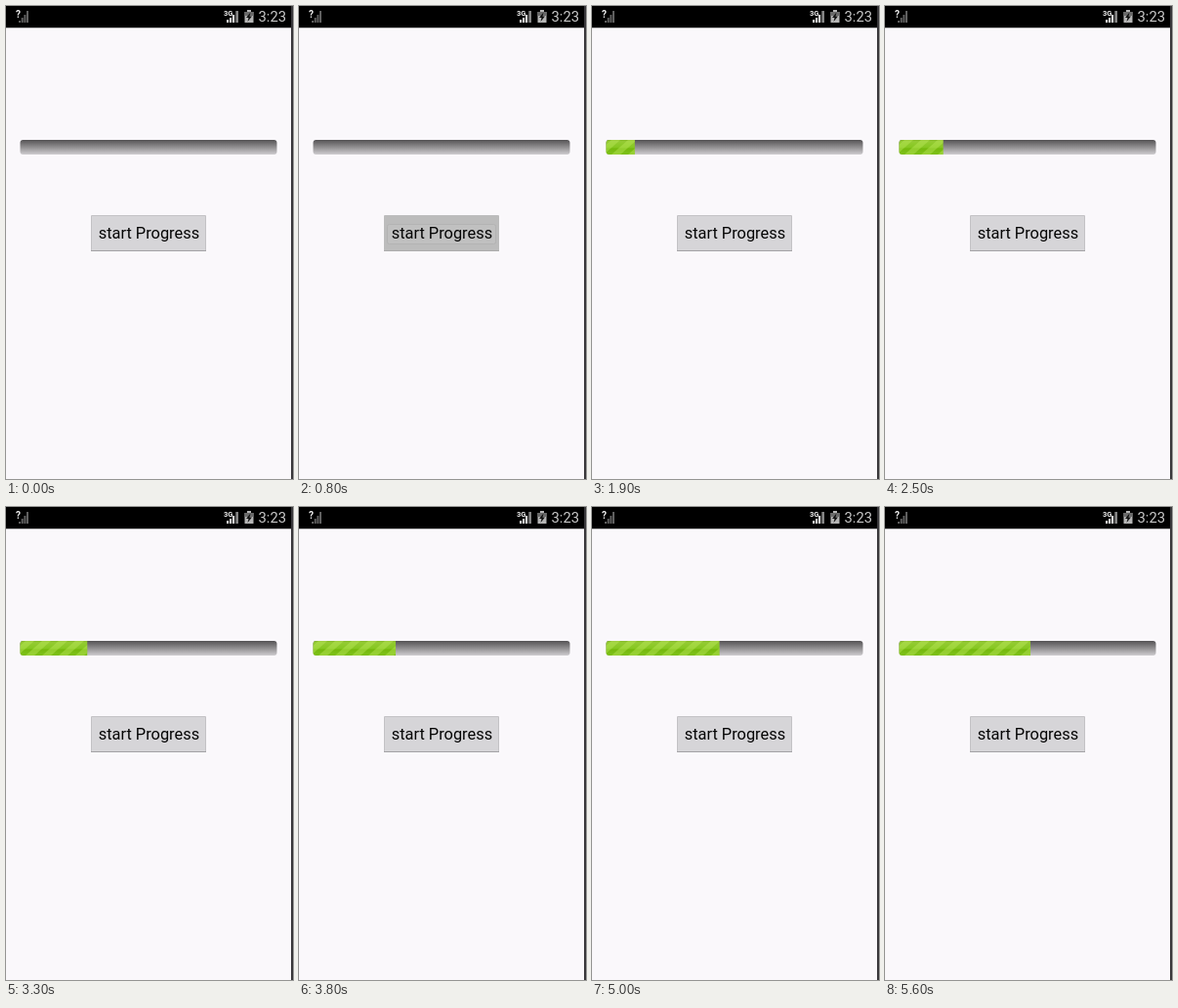
An HTML page that plays this animation: 294 px wide and 484 px high, repeating every 5700 ms.

```html
<!DOCTYPE html>
<html lang="en">
<head>
<meta charset="utf-8">
<title>Progress bar</title>
<style>
  html, body { margin: 0; width: 100%; height: 100%; overflow: hidden; background: #faf8fb; }
  svg { display: block; width: 294px; height: 484px; font-family: Roboto, sans-serif; }
</style>
</head>
<body>
<svg viewBox="0 0 294 484">
  <defs>
    <linearGradient id="track" x2="0" y2="1">
      <stop offset="0" stop-color="#555355"/>
      <stop offset=".12" stop-color="#636163"/>
      <stop offset=".55" stop-color="#979597"/>
      <stop offset="1" stop-color="#cfcdd0"/>
    </linearGradient>
    <linearGradient id="green" x2="0" y2="1">
      <stop offset="0" stop-color="#86b82b"/>
      <stop offset=".12" stop-color="#94cb32"/>
      <stop offset=".5" stop-color="#86c721"/>
      <stop offset=".6" stop-color="#75b90c"/>
      <stop offset="1" stop-color="#7fc11c"/>
    </linearGradient>
    <pattern id="stripes" x="14" y="137" width="17" height="15" patternUnits="userSpaceOnUse">
      <path d="M-11 15L6 0h9L-2 15zM6 15L23 0h9L15 15z" fill="#c4ec62" opacity=".38"/>
    </pattern>
    <clipPath id="barShape"><rect x="14.5" y="137" width="263" height="15" rx="3"/></clipPath>
  </defs>

  <rect width="294" height="484" fill="#faf8fb"/>
  <rect x="292" width="2" height="484" fill="#38373a"/>
  <rect width="292" height="22" fill="#000"/>
  <rect y="22" width="292" height="1" fill="#b9b8ba"/>

  <!-- status icons -->
  <path d="M13 17v-2h2v2zM15.7 17v-5h2v5zM18.4 17V9h2v8zM21 17V5h2v12z" fill="#606060"/>
  <text x="10" y="12" font-size="10" font-weight="700" fill="#eee">?</text>
  <path d="M226 17v-3h2.2v3zM229 17v-5h2.2v5zM232 17V9h2.2v8z" fill="#d4d4d4"/>
  <path d="M235.3 17V5h2.7v12z" fill="#858585"/>
  <text x="223" y="10" font-size="7.5" font-weight="700" fill="#eee">3G</text>
  <path d="M247 4h4v2h2.500v11h-9V6h2.500z" fill="#b5b5b5"/>
  <path d="M244.500 6h9v4h-9z" fill="#6b6b6b"/>
  <path d="M250.500 6.500L246 12h2.500l-1 4 4.500-5.500h-2.500z" fill="#111"/>
  <text x="258.500" y="16" font-size="14.800" fill="#c9c9c9">3:23</text>

  <g clip-path="url(#barShape)">
    <rect x="14" y="137" width="264" height="15" fill="url(#track)"/>
    <rect class="fill" x="14" y="137" height="15" fill="url(#green)"/>
    <rect class="fill" x="14" y="137" height="15" fill="url(#stripes)"/>
  </g>

  <g id="idle">
    <rect x="87" y="214" width="118" height="37" rx="1" fill="#c3c2c5"/>
    <rect x="88" y="215" width="116" height="35" fill="#d6d5d8"/>
    <rect x="87" y="250" width="118" height="1" fill="#a3a2a5"/>
  </g>
  <g id="pressed">
    <rect x="87" y="214" width="118" height="37" rx="1" fill="#bcbcbc"/>
    <rect x="90.500" y="223.500" width="111" height="20" rx="2" fill="#c0c0c0" stroke="#b3b3b3"/>
    <rect x="87" y="250" width="118" height="1" fill="#acacac"/>
  </g>
  <text x="94.700" y="238" font-size="16.400" fill="#050505">start Progress</text>
</svg>
<script>
  const LOOP = 5700, TICK = 100, START = 800;
  const doubleTicks = [2900, 3800, 4200, 5400];
  const skippedTick = 3900;
  const fills = document.querySelectorAll('.fill');
  const idle = document.getElementById('idle');
  const pressed = document.getElementById('pressed');

  function percentAt(time) {
    const ticks = Math.max(0, Math.floor((time - START) / TICK));
    const extra = doubleTicks.filter(at => time >= at).length;
    return ticks + extra - (time >= skippedTick ? 1 : 0);
  }

  function draw(now) {
    const time = now % LOOP;
    const percent = percentAt(time);
    const width = percent ? 0.92 + percent * 2.628 : 0;
    fills.forEach(rect => rect.setAttribute('width', width));
    const down = time >= START && time < START + TICK;
    idle.style.display = down ? 'none' : '';
    pressed.style.display = down ? '' : 'none';
  }

  let origin;
  function frame(now) {
    origin ??= now;
    draw(now - origin);
    requestAnimationFrame(frame);
  }
  draw(0);
  requestAnimationFrame(frame);
</script>
</body>
</html>
```
